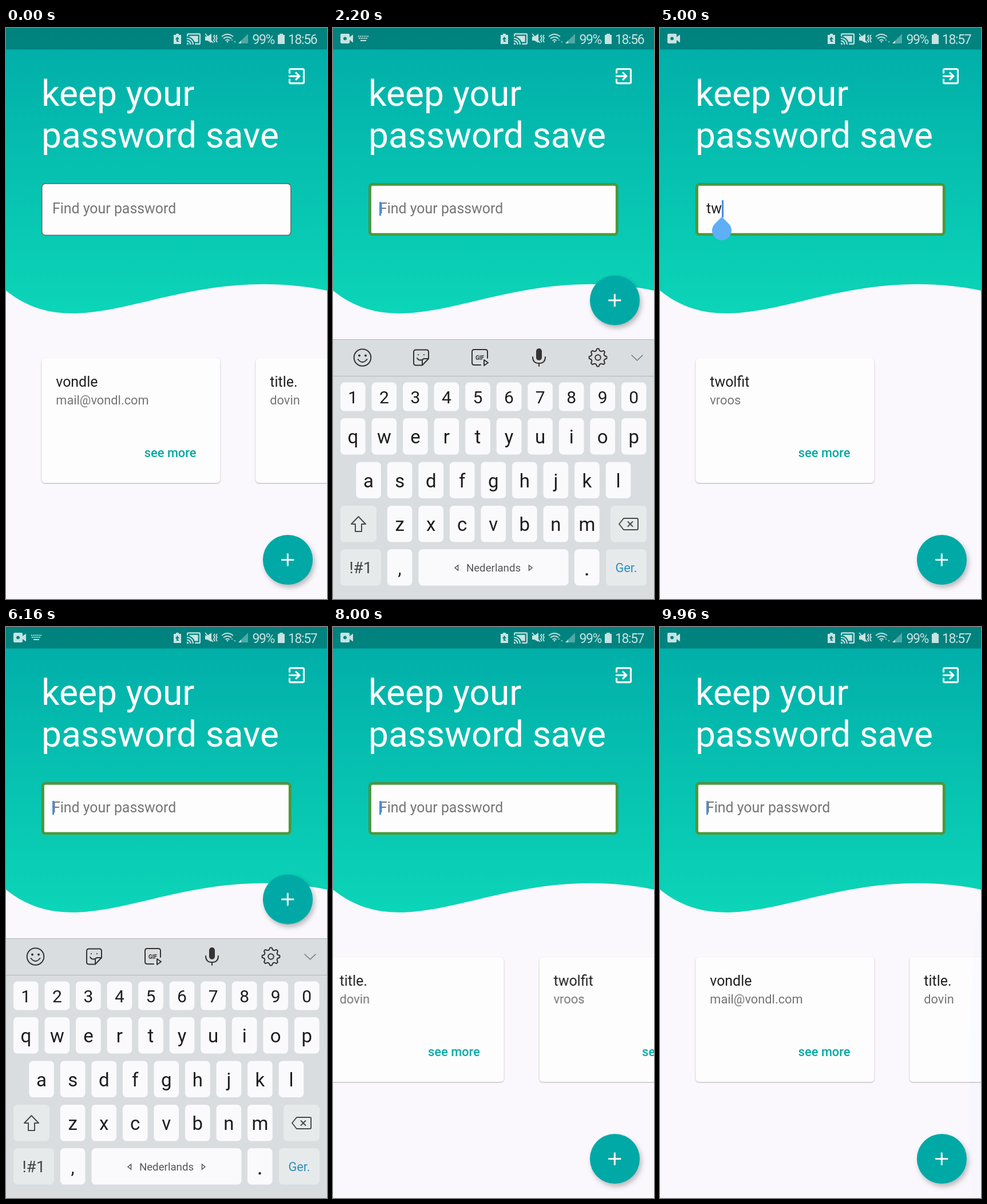
Recreate the animation shown at these times as an HTML page. Size 561 by 998 pixels, loop 10 s.

```html
<!DOCTYPE html>
<html lang="en">
<head>
<meta charset="utf-8">
<title>Password keeper</title>
<style>
html, body { margin: 0; width: 100%; height: 100%; overflow: hidden; background: #faf8fc; }
svg { display: block; font-family: Roboto, sans-serif; }
.mid { text-anchor: middle; }
.line { fill: none; stroke: #333; stroke-width: 2; stroke-linejoin: round; stroke-linecap: round; }
.title { font-size: 24.9px; fill: #1f1f1f; }
.sub { font-size: 21.8px; fill: #757575; }
.more { font-size: 21.8px; font-weight: 500; fill: #00a8a2; }
.card rect { fill: #fefdfe; filter: drop-shadow(0 1px 1.3px rgba(0,0,0,.3)); }
.status { fill: #fff; opacity: .78; font-size: 23px; letter-spacing: -1.4px; }
.key { fill: #fafafd; }
.alt { fill: #e7eaeb; }
#keys text { fill: #1d1d1d; }
.bubble rect { fill: #fafafd; filter: drop-shadow(0 1px 2px rgba(0,0,0,.35)); }

/* 1% of the loop is 100 ms */
.step { animation: 10s step-end infinite; }
.move { animation: 10s linear infinite; }

#cam { animation-name: cam; }
@keyframes cam { 0%, .2% { opacity: 0 } 2.3%, 100% { opacity: 1 } }

#focus { animation-name: focus; }
@keyframes focus { 0%, 12.2% { opacity: 0 } 14%, 100% { opacity: 1 } }

#kbIcon { animation-name: kbIcon; }
@keyframes kbIcon { 0%, 37%, 66.2% { opacity: 0 } 14.2%, 52.6% { opacity: 1 } }

#early { animation-name: early; }
#late { animation-name: late; }
@keyframes early { 0% { opacity: 1 } 37.4% { opacity: 0 } }
@keyframes late { 0% { opacity: 0 } 37.4% { opacity: 1 } }

#fab { animation-name: fab; }
@keyframes fab {
  0%, 36.6%, 65.8% { transform: none }
  13.8%, 52.2% { transform: translateY(-453.5px) }
}

#board { animation-name: board; }
@keyframes board {
  0%, 13.4% { transform: translateY(456px); animation-timing-function: ease-out }
  16.7%, 36.5% { transform: none; animation-timing-function: ease-in }
  38.6%, 52.1% { transform: translateY(456px); animation-timing-function: ease-out }
  53.9%, 65.7% { transform: none; animation-timing-function: ease-in }
  67.8%, 100% { transform: translateY(456px) }
}

#hint { animation-name: hint; fill: #757575; }
#one { animation-name: one; }
#two { animation-name: two; }
@keyframes hint { 0%, 61% { opacity: 1 } 25.8% { opacity: 0 } }
@keyframes one { 0%, 28.2%, 61% { opacity: 0 } 25.8%, 58.2% { opacity: 1 } }
@keyframes two { 0%, 58.2% { opacity: 0 } 28.2% { opacity: 1 } }

#caret { animation-name: blink; }
@keyframes blink {
  0%, 16.6%, 33.4%, 41.8%, 71%, 81%, 91% { opacity: 0 }
  12.4%, 21.8%, 36.6%, 46.6%, 76%, 86%, 96% { opacity: 1 }
}
#caret rect { animation-name: caret; transform-origin: 82px 316px; }
@keyframes caret {
  0%, 61% { transform: none }
  25.8%, 58.2% { transform: translateX(8px) scaleY(1.25) }
  28.2% { transform: translateX(27px) scaleY(1.25) }
}

#handle { animation-name: handle; }
@keyframes handle {
  0%, 48.6% { opacity: 0 }
  49.9%, 58.1% { opacity: 1 }
  58.2%, 100% { opacity: 0 }
}

#popT { animation-name: popT; }
#popW { animation-name: popW; }
#del { animation-name: del; }
@keyframes popT { 0%, 26.2% { opacity: 0 } 24.6% { opacity: 1 } }
@keyframes popW { 0%, 28.6% { opacity: 0 } 26.8% { opacity: 1 } }
@keyframes del { 0%, 59%, 61.4% { opacity: 0 } 57.8%, 60.2% { opacity: 1 } }

#all { animation-name: all; }
#found { animation-name: two; }
@keyframes all { 0%, 61% { opacity: 1 } 28.2% { opacity: 0 } }
#track { animation-name: track; }
@keyframes track {
  0%, 74.5% { transform: none; animation-timing-function: cubic-bezier(.3,.3,.4,1) }
  84.8%, 89.8% { transform: translateX(-561px); animation-timing-function: cubic-bezier(.333,.667,.667,1) }
  97.05%, 100% { transform: none }
}

#glow { animation-name: glow; transform-origin: 561px 0; }
@keyframes glow {
  0%, 85% { transform: scaleX(0); opacity: 0; animation-timing-function: ease-out }
  88%, 90.18% { transform: scaleX(.335); opacity: .13; animation-timing-function: cubic-bezier(.333,.442,.667,.775) }
  100% { transform: scaleX(.087); opacity: .016 }
}
</style>
</head>
<body>
<svg width="561" height="998" viewBox="0 0 561 998">
  <defs>
    <linearGradient id="sea" gradientUnits="userSpaceOnUse" x1="0" y1="0" x2="0" y2="499">
      <stop offset="0" stop-color="#00aca8"/><stop offset="1" stop-color="#0cd5b8"/>
    </linearGradient>
    <clipPath id="list"><path d="M0 499H561V998H0z"/></clipPath>
  </defs>

  <path fill="#faf8fc" d="M0 0H561V998H0z"/>
  <path fill="url(#sea)" d="M0 0V459C140 571 295 405 561 459V0z"/>
  <path fill="#000" fill-opacity=".25" d="M0 0H561V37.5H0z"/>

  <g class="status">
    <g id="cam" class="move">
      <path fill-rule="evenodd" d="M15 10H27Q29 10 29 12V16L35 11.5V25.5L29 21V25Q29 27 27 27H15Q13 27 13 25V12Q13 10 15 10zM21 15.5a3 3 0 1 0 .01 0z"/>
    </g>
    <g id="kbIcon" class="step" fill="none" stroke="#fff" stroke-width="2">
      <path stroke-dasharray="2 1.2" d="M44 14.5H62M45 18H61"/><path d="M48 22H58"/>
    </g>
    <path fill-rule="evenodd" d="M297 10H302V12H306V28H293V12H297zM299.5 15L296 20H298V24H302V22H300V20H303z"/>
    <path transform="translate(315 6) scale(1.09)" d="M1 18v3h3c0-1.66-1.34-3-3-3zm0-4v2c2.76 0 5 2.24 5 5h2c0-3.87-3.13-7-7-7zm18-7H5v1.63c3.96 1.28 7.09 4.41 8.37 8.37H19V7zM1 10v2c4.97 0 9 4.03 9 9h2c0-6.08-4.93-11-11-11zm20-7H3c-1.1 0-2 .9-2 2v3h2V5h18v14h-7v2h7c1.1 0 2-.9 2-2V5c0-1.1-.9-2-2-2z"/>
    <g fill="none" stroke="#fff" stroke-width="1.8">
      <path d="M348 10L362 26M365 12L363 15L365 18L363 21L365 25M369 12L367 15L369 18L367 21L369 25"/>
      <path d="M377 15Q387 7 397 15M380 18.5Q387 13 394 18.5M383.5 22Q387 19 390.5 22"/>
    </g>
    <path d="M348 15H352L359 10V26L352 22H348zM385 23H389L387 26z"/>
    <path d="M393 22H397L395 19zM398 23H402L400 26z" opacity=".6"/>
    <path d="M423 10V27H406z" opacity=".4"/><path d="M411 22V27H406z"/>
    <path d="M478 10H484V12H487V28H475V12H478z"/>
    <text x="430.5" y="27.5">99%</text>
    <text id="early" class="step" x="493" y="27.5">18:56</text>
    <text id="late" class="step" x="493" y="27.5">18:57</text>
  </g>

  <path fill="#fff" transform="translate(489.3 65.5) scale(1.558)" d="M10.09 15.59L11.5 17l5-5-5-5-1.41 1.41L12.67 11H3v2h9.67zM19 3H5c-1.11 0-2 .9-2 2v4h2V5h14v14H5v-4H3v4c0 1.1.89 2 2 2h14c1.1 0 2-.9 2-2V5c0-1.1-.9-2-2-2z"/>
  <g fill="#fff" font-size="62.3">
    <text x="62" y="136">keep your</text>
    <text x="62" y="209">password save</text>
  </g>

  <rect x="62.8" y="272" width="435" height="90.3" rx="6" fill="#fefdfe" stroke="#5c6664" stroke-width="1.4"/>
  <rect id="focus" class="move" x="64.7" y="273.6" width="431.4" height="87.2" rx="4" fill="none" stroke="#4a9a38" stroke-width="4.4"/>
  <g class="title">
    <text id="hint" class="step" x="81" y="324">Find your password</text>
    <text id="one" class="step" x="81" y="324">t</text>
    <text id="two" class="step" x="81" y="324">tw</text>
  </g>
  <g id="caret" class="step"><rect class="step" x="81" y="304" width="3.2" height="24" fill="#4a8fe0"/></g>
  <path id="handle" class="move" fill="#5eaff5" d="M108 330L120 342A17 17 0 1 1 96 342z"/>

  <g clip-path="url(#list)">
    <g id="all" class="step"><g id="track" class="move"></g></g>
    <g id="found" class="step"></g>
    <ellipse id="glow" class="move" cx="716" cy="800" rx="374" ry="374" fill="#2196f3"/>
  </g>

  <g id="fab" class="step">
    <circle cx="492.5" cy="929.5" r="43.6" fill="#00a9a6" style="filter:drop-shadow(3px 5px 4px rgba(0,0,0,.26))"/>
    <path d="M492.3 918.5V940.5M481.3 929.5H503.3" stroke="#fff" stroke-width="3"/>
  </g>

  <g id="board" class="move">
    <path fill="#dadde0" d="M0 544H561V998H0z"/>
    <path fill="none" stroke="#b3b6b9" d="M0 544.5H561M0 608.5H561"/>
    <g class="line">
      <circle cx="51.5" cy="576" r="14.8"/><path d="M43.5 579Q51.5 589 59.5 579"/>
      <path d="M145 562.5H163Q167 562.5 167 566.5V578L156 589.5H145Q141 589.5 141 585.5V566.5Q141 562.5 145 562.5zM167 578H160Q156 578 156 582V589M147 577Q150 582 155 580M149 571v.2M159 571v.2"/>
      <path d="M258 589H247Q243 589 243 585V566Q243 562 247 562H266Q270 562 270 566V577M264 580V590L271 585z"/>
      <path d="M349 575Q349 586 360 586T371 575M360 586V591"/>
      <path id="gear"/><circle cx="463" cy="576" r="4.8"/>
      <path stroke="#777" stroke-width="1.6" d="M522 572L531.5 581L541 572"/>
    </g>
    <g fill="#333">
      <circle cx="46" cy="572.5" r="2"/><circle cx="57" cy="572.5" r="2"/>
      <rect x="355" y="560" width="10" height="21" rx="5"/>
      <text class="mid" x="256.5" y="579.5" font-size="10" font-weight="700">GIF</text>
    </g>
    <g id="keys"></g>
    <rect id="del" class="step" x="485" y="835" width="63" height="63.5" rx="7" fill="#000" fill-opacity=".14"/>
    <g class="line" style="stroke:#4a4a4a">
      <path d="M44.5 854L57 867H50V880H39V867H32z"/>
      <path d="M508 857H531Q533 857 533 859V875Q533 877 531 877H508L500 867zM515.5 863L523.5 871M523.5 863L515.5 871"/>
    </g>
    <path fill="none" stroke="#555" stroke-width="1.5" d="M218.5 939V948L213 943.5zM342.5 939V948L348 943.5z"/>
    <g id="popT" class="bubble step"></g>
    <g id="popW" class="bubble step"></g>
  </g>
</svg>
<script>
const $ = id => document.getElementById(id);

const card = (x, title, user) => `<g class="card" transform="translate(${x} 577)">
  <rect width="312" height="218" rx="6"/>
  <text class="title" x="25" y="50">${title}</text>
  <text class="sub" x="25" y="81">${user}</text>
  <text class="more" x="179.5" y="173">see more</text></g>`;

$('track').innerHTML = card(62.3, 'vondle', 'mail@vondl.com') + card(436.3, 'title.', 'dovin') + card(810.3, 'twolfit', 'vroos');
$('found').innerHTML = card(62.3, 'twolfit', 'vroos');

const pitch = 54.55, wide = 43.6;
const key = (x, y, w, h, label = '', base = 0, size = 33, cls = '', color = '') =>
  `<rect class="key ${cls}" x="${x}" y="${y}" width="${w}" height="${h}" rx="7"/>
   <text class="mid" x="${x + w / 2}" y="${y + base}" font-size="${size}" style="fill:${color}">${label}</text>`;
const row = (chars, x, y, h, base, size) =>
  [...chars].map((c, i) => key(x + i * pitch, y, wide, h, c, base, size)).join('');

$('keys').innerHTML =
  row('1234567890', 13, 619.5, 50, 36, 30) +
  row('qwertyuiop', 13, 682, 63.5, 44) +
  row('asdfghjkl', 40.3, 758.5, 63.5, 44) +
  row('zxcvbnm', 94.8, 835, 63.5, 44) +
  key(13, 835, 63, 63.5, '', 0, 0, 'alt') +
  key(485, 835, 63, 63.5, '', 0, 0, 'alt') +
  key(13, 911, 71, 63.5, '!#1', 42, 28, 'alt', '#444') +
  key(94.8, 911, wide, 63.5, ',', 44, 31) +
  key(149.5, 911, 262, 63.5, 'Nederlands', 38.5, 18.7, '', '#555') +
  key(422, 911, wide, 63.5, '.', 46, 38) +
  key(477, 911, 71, 63.5, 'Ger.', 40, 21.8, 'alt', '#2b90bd');

const bubble = (x, c) => `<rect x="${x - 38}" y="612" width="76" height="78" rx="9"/>
  <text class="mid" x="${x}" y="666" font-size="46" fill="#1d1d1d">${c}</text>`;
$('popT').innerHTML = bubble(253, 't');
$('popW').innerHTML = bubble(89.5, 'w');

// Eight teeth, four corners each
const teeth = Array.from({ length: 32 }, (_, i) => {
  const a = (i - 0.5) * Math.PI / 16, r = i % 4 < 2 ? 15.5 : 12;
  return `${463 + r * Math.sin(a)} ${576 - r * Math.cos(a)}`;
});
$('gear').setAttribute('d', `M${teeth.join('L')}z`);
</script>
</body>
</html>
```
